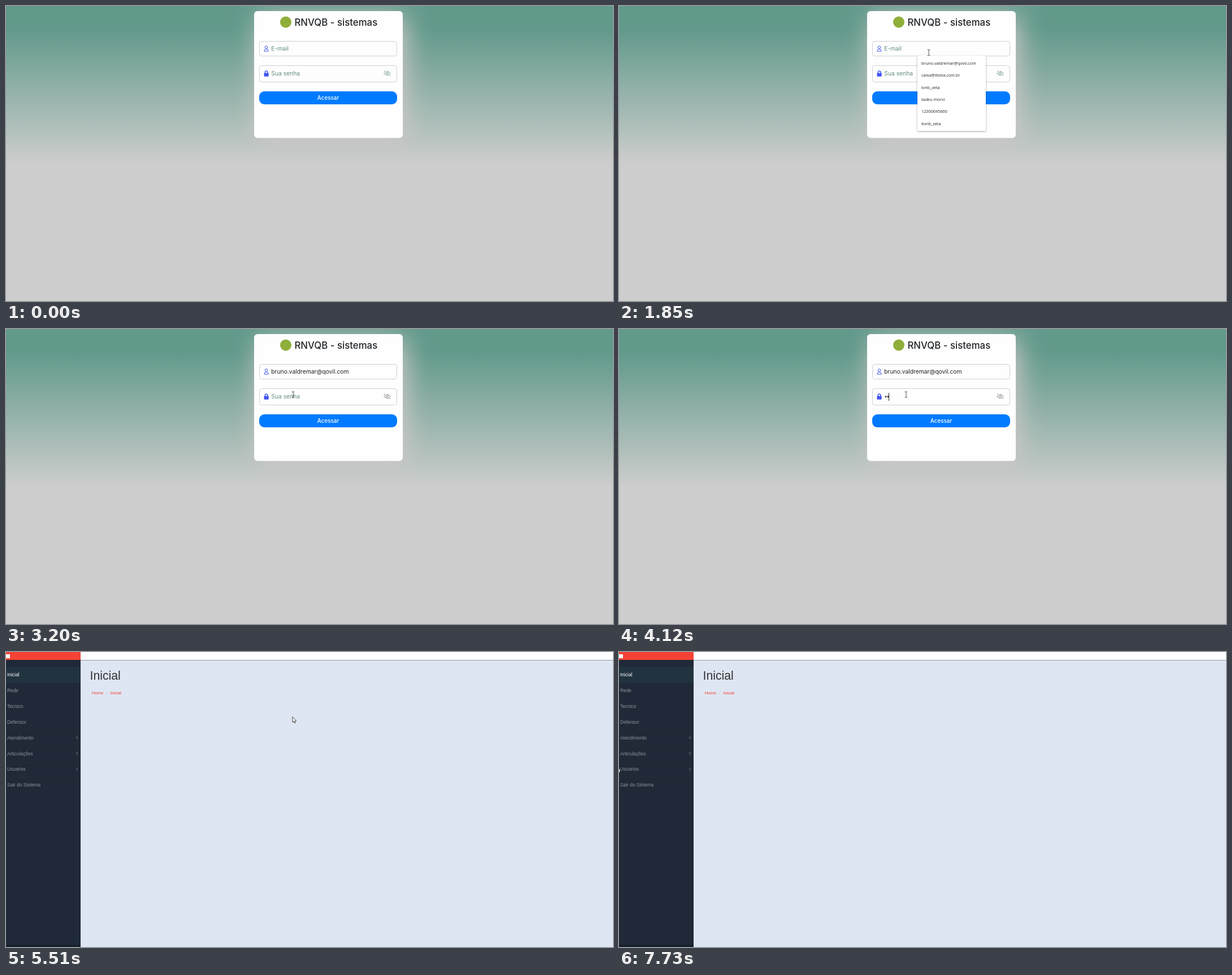
These frames come from a looping animation (1074x522 px, 8000 ms). An HTML page with a canvas:

```html
<!DOCTYPE html>
<html lang="pt-BR">
<head>
<meta charset="utf-8">
<title>Login</title>
<style>
  html, body { margin: 0; width: 100%; height: 100%; overflow: hidden; }
  canvas { display: block; width: 1074px; height: 522px; }
</style>
</head>
<body>
<canvas id="stage" width="1074" height="522"></canvas>
<script>
const ctx = document.getElementById('stage').getContext('2d');
const W = 1074, H = 522, LOOP = 8000;
const UI = 'Inter, sans-serif';
const ARIAL = '"Liberation Sans", Arial, sans-serif';
const POPUP = '"Open Sans", sans-serif';
const EMAIL = 'bruno.valdremar@qovil.com';
const HISTORY = [EMAIL, 'caixa@dolva.com.br', 'tvnb_zeta', 'tadeu morvi', '12300045600', 'ltvnb_zeta'];
const MENU = ['Inicial', 'Rede', 'Tecnico', 'Defensor', 'Atendimento', 'Articulações', 'Usuarios', 'Sair do Sistema'];

// Pointer moves: start, end, steps, target x, target y
const MOVES = [
  [70, 850, 11, 545, 74],
  [1780, 2110, 6, 557, 106],
  [2380, 2580, 3, 508, 116],
  [5440, 5440, 1, 507, 115],
  [6500, 7240, 11, 25, 188],
  [7310, 7450, 3, 1, 200],
  [7730, 7730, 1, -4, 201]
];
const CLICKS = [[980, 1050], [2170, 2240], [2650, 2810]];
const KEYS = [3860, 4120, 4250, 4380, 4580];

const between = (t, a, b) => t >= a && t < b;
const smooth = u => u * u * (3 - 2 * u);

function text(s, x, y, font, color, align = 'left') {
  ctx.font = font;
  ctx.fillStyle = color;
  ctx.textAlign = align;
  ctx.fillText(s, x, y);
}

function rect(x, y, w, h, color) {
  ctx.fillStyle = color;
  ctx.fillRect(x, y, w, h);
}

function round(x, y, w, h, r, fill, stroke) {
  ctx.beginPath();
  ctx.roundRect(x, y, w, h, r);
  if (fill) { ctx.fillStyle = fill; ctx.fill(); }
  if (stroke) { ctx.strokeStyle = stroke; ctx.lineWidth = 1; ctx.stroke(); }
}

function disc(x, y, r, color) {
  ctx.beginPath();
  ctx.arc(x, y, r, 0, Math.PI * 2);
  ctx.fillStyle = color;
  ctx.fill();
}

function path(d, x, y, fill, stroke, width = 1) {
  const p = new Path2D(d);
  ctx.save();
  ctx.translate(x, y);
  ctx.lineJoin = ctx.lineCap = 'round';
  if (fill) { ctx.fillStyle = fill; ctx.fill(p); }
  if (stroke) { ctx.strokeStyle = stroke; ctx.lineWidth = width; ctx.stroke(p); }
  ctx.restore();
}

function shadow(color, blur, x, y) {
  ctx.shadowColor = color;
  ctx.shadowBlur = blur;
  ctx.shadowOffsetX = x;
  ctx.shadowOffsetY = y;
}

function pointer(t) {
  let x = 1026, y = 521;
  for (const [a, b, n, tx, ty] of MOVES) {
    if (t < a) break;
    const k = b > a ? Math.min(n, 1 + Math.floor((t - a) / (b - a) * (n - 1) + 1e-6)) : n;
    const e = smooth(k / n);
    x += (tx - x) * e;
    y += (ty - y) * e;
  }
  return [x, y];
}

function pointerKind(t, x, y) {
  if (t >= 5440) return x < 132 ? 'hand' : 'arrow';
  if (between(t, 980, 2380) && y > 88) return 'hand';
  if (x < 448 || x > 692) return 'arrow';
  if (between(y, 62, 89) || between(y, 105, 135)) return 'beam';
  return between(y, 151, 174) ? 'hand' : 'arrow';
}

function drawPointer(t) {
  if (t < 70) return;
  const [x, y] = pointer(t);
  const kind = pointerKind(t, x, y);
  if (CLICKS.some(([a, b]) => between(t, a, b))) disc(x - 1.5, y, 6.8, '#fdf566');
  if (kind === 'beam') {
    path('M-2 -5H-.6L0 -4.5L.6 -5H2M0 -4.5V4.5M-2 5H-.6L0 4.5L.6 5H2', x, y, null, '#555', 1);
  } else if (kind === 'hand') {
    path('M-1.2 7V.8Q0 -.6 1.2 .8V5Q2.5 4 3.2 5.2Q4.5 4.5 5 5.7Q6 5.5 6 6.8V9Q6 11 4.8 12.5H-.5' +
      'Q-1 11 -3 8.5Q-3.5 6.5 -1.2 7.5ZM1.2 5V7M3.2 5.2V7M5 5.8V7.2', x, y, '#fff', '#222', .9);
  } else {
    path('M0 0V9.5L2.1 7.6L3.6 10.8L5 10.2L3.6 7H6.4Z', x, y, '#fff', '#333', .9);
  }
}

function drawBackdrop() {
  const g = ctx.createLinearGradient(0, 40, 0, 278);
  g.addColorStop(0, '#61998b');
  g.addColorStop(1, '#cccdcc');
  rect(0, 0, W, H, g);
  shadow('#cfc9c9', 46, 7, 9);
  round(439, 9, 263, 224.5, 6, '#fefefe');
  shadow('transparent', 0, 0, 0);
}

function drawIcons(focused) {
  const blue = '#4154f1', eye = focused ? '#808080' : '#6c9888';
  ctx.strokeStyle = blue;
  ctx.lineWidth = 1;
  ctx.beginPath();
  ctx.arc(460.5, 73, 2.3, 0, Math.PI * 2);
  ctx.stroke();
  path('M-3.7 4.6Q-3.7 1.4 -1 1.4H1Q3.7 1.4 3.7 4.6Z', 460.5, 75, null, blue);
  round(456.5, 118.6, 8.2, 6.2, 1, blue);
  path('M-2.2 0V-1.5A2.2 2.2 0 0 1 2.2 -1.5V0', 460.6, 118.6, null, blue, 1.5);
  path('M-5.5 0Q0 -7 5.5 0Q0 7 -5.5 0ZM-1.9 0A1.9 1.9 0 0 1 1.9 0A1.9 1.9 0 0 1 -1.9 0Z', 674.6, 119.2, null, eye);
  path('M-5.2 -4.3L5.2 4.3', 674.6, 119.2, null, '#fefefe', 2.6);
  path('M-5.2 -4.3L5.2 4.3', 674.6, 119.2, null, eye);
}

function caret(x, y) {
  rect(Math.round(x), y, 1, 14, '#222');
}

function drawEmail(t) {
  const font = '10.3px ' + UI;
  round(448.5, 62.5, 243, 26, 4, '#fefefe', '#cfd0d2');
  if (between(t, 1980, 2240)) rect(469, 68, 219, 14, '#e8f0fe');
  if (t < 1980) text('E-mail', 469.3, 78.7, font, '#618f80');
  else text(EMAIL, 469.3, 78.7, font, '#222');
  if (between(t, 980, 1510)) caret(469, 68);
  if (between(t, 2240, 2650)) caret(469.5 + ctx.measureText(EMAIL).width, 68);
}

function drawPassword(t) {
  round(448.5, 105.5, 243, 29, 4, '#fefefe', '#cfd0d2');
  const typed = KEYS.filter(k => t >= k).length;
  if (!typed) text('Sua senha', 469.3, 123.2, '10.3px ' + UI, '#618f80');
  for (let i = 0; i < typed; i++) disc(472 + i * 3.85, 119.7, 1.35, '#222');
  // The blink restarts on focus and on every key
  const since = t - (typed ? KEYS[typed - 1] : 2650);
  if (between(t, 2650, 5440) && since % 1070 < 530) caret(469 + typed * 3.95, 113);
}

function drawPopup() {
  shadow('rgba(0,0,0,.35)', 3, 0, 1);
  rect(528, 88, 121, 133, '#fff');
  shadow('transparent', 0, 0, 0);
  path('M-5 4.5L0 0L5 4.5', 540, 84, '#fff', '#e2e2e2', .7);
  rect(529, 88, 119, 2, '#fff');
  HISTORY.forEach((s, i) => text(s, 535, 103.7 + i * 21.4, '7.3px ' + POPUP, '#222'));
}

function drawLogin(t) {
  drawBackdrop();
  disc(495, 28.5, 10, '#8fae3a');
  text('RNVQB - sistemas', 510.5, 35.2, '500 16.8px ' + UI, '#212529');
  drawEmail(t);
  drawPassword(t);
  drawIcons(t >= 2650);
  round(448, 151, 244, 23, 9, '#007bff');
  text('Acessar', 570, 165.8, '500 9.9px ' + UI, '#fff', 'center');
  if (between(t, 980, 2240)) drawPopup();
}

function drawDashboard() {
  rect(0, 0, W, H, '#dfe6f3');
  rect(132, 0, W - 132, 14, '#fff');
  rect(132, 14, W - 132, 1, '#9599a1');
  rect(0, 14, 132, H - 14, '#1f2937');
  rect(0, 0, 132, 14, '#f44336');
  rect(0, 4, 7, 7, '#fff');
  rect(0, 26, 132, 28, '#223340');
  rect(0, 518, 132, 4, '#18202c');
  MENU.forEach((s, i) => {
    const y = 40 + i * 27.9;
    rect(0, Math.round(y + 14), 132, 1, '#232d3a');
    text(s, 2, y + 3, '8.4px ' + ARIAL, i ? '#8b949e' : '#fff');
    if (between(i, 4, 7)) path('M1.1 -2.3L-1.1 0L1.1 2.3', 125.5, y, null, '#8b949e', .9);
  });
  text('Inicial', 148.5, 49, '21.2px ' + ARIAL, '#333');
  text('Home', 151.7, 74.8, '7.7px ' + ARIAL, '#f44336');
  text('/', 177.3, 74.8, '7.7px ' + ARIAL, '#bcc2cc');
  text('Inicial', 184.3, 74.8, '7.7px ' + ARIAL, '#f44336');
}

const start = performance.now();

function frame() {
  const t = (performance.now() - start) % LOOP;
  if (t < 5510) drawLogin(t);
  else drawDashboard();
  drawPointer(t);
  requestAnimationFrame(frame);
}
frame();
</script>
</body>
</html>
```
